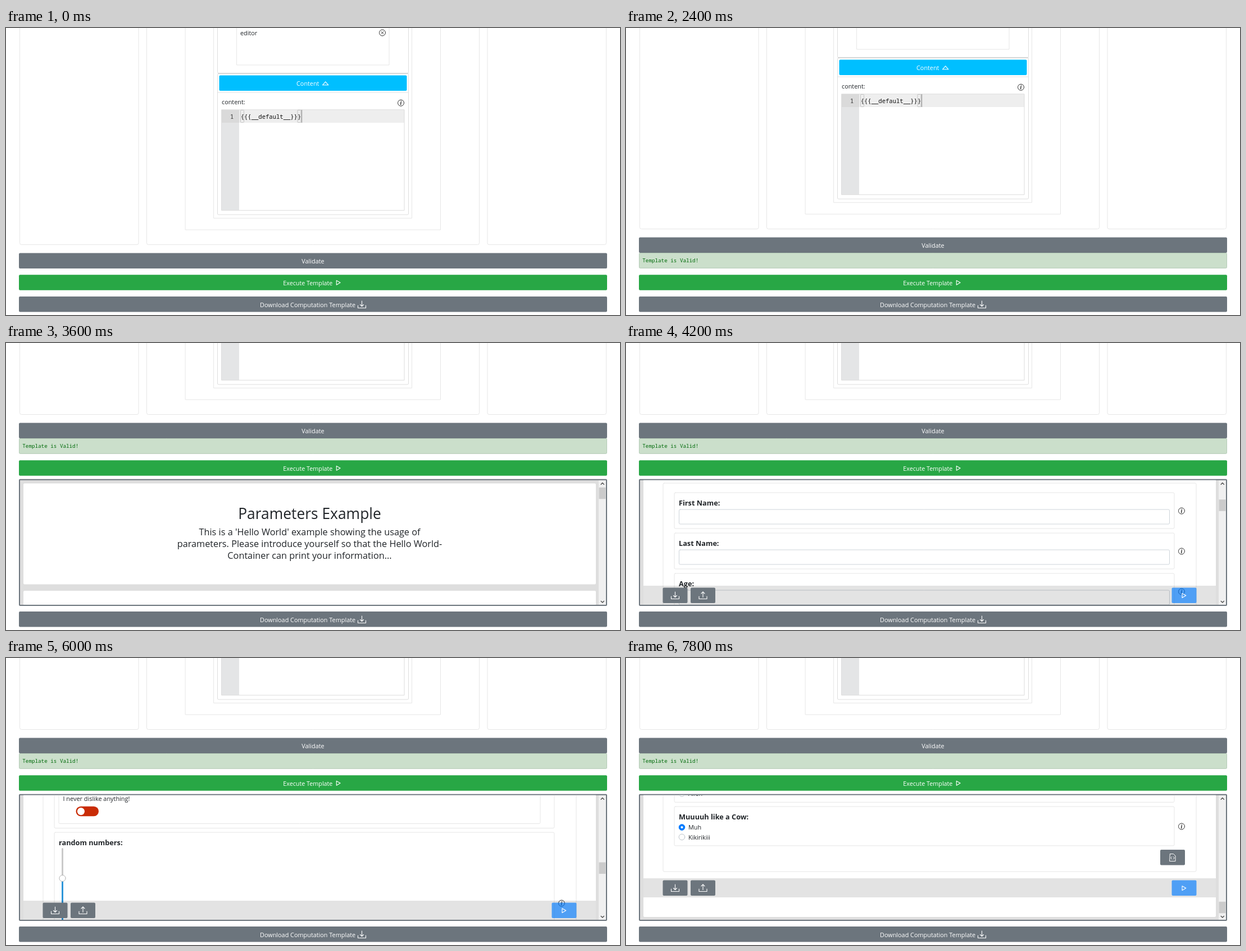
Write an HTML page with a canvas that moves like this. It is 1093 px wide and 512 px high and loops after 8000 ms.

```html
<!DOCTYPE html>
<html lang="en">
<head>
<meta charset="utf-8">
<title>Template editor</title>
<style>
  html, body { margin: 0; width: 100%; height: 100%; overflow: hidden; background: #fff; }
  canvas { display: block; width: 1093px; height: 512px; }
</style>
</head>
<body>
<canvas id="stage" width="1093" height="512"></canvas>
<script>
const ctx = document.getElementById('stage').getContext('2d');
const SANS = '"Open Sans", "Noto Sans", sans-serif';
const MONO = '"Noto Sans Mono", "DejaVu Sans Mono", monospace';
const INK = '#212529', GRAY = '#6c757d', GREEN = '#28a745', LINE = '#e6e6e6', BLUE = '#007bff';
const LOOP = 8000, STEP = 600;
const SCROLLS = [0, 237, 473, 825, 1177, 1480, 1740, 1950];
const FORM_TOP = 487, FORM_END = 2331, BAR_END = 2343;

function path(x1, y1, x2, y2, r = 2) {
  ctx.beginPath();
  ctx.roundRect(x1, y1, x2 - x1, y2 - y1, r);
}
function fill(x1, y1, x2, y2, color, r = 0) {
  path(x1, y1, x2, y2, r);
  ctx.fillStyle = color;
  ctx.fill();
}
function frame(x1, y1, x2, y2, color = LINE, r = 2, w = 1) {
  path(x1, y1, x2, y2, r);
  ctx.strokeStyle = color;
  ctx.lineWidth = w;
  ctx.stroke();
}
function text(str, x, y, size = 10.85, color = INK, { weight = 400, family = SANS, align = 'left' } = {}) {
  ctx.font = `${weight} ${size}px ${family}`;
  ctx.textAlign = align;
  ctx.fillStyle = color;
  ctx.fillText(str, x, y);
}
function line(points, color, w = 1, close = false) {
  ctx.beginPath();
  points.forEach(([x, y]) => ctx.lineTo(x, y));
  if (close) ctx.closePath();
  ctx.strokeStyle = color;
  ctx.lineWidth = w;
  ctx.lineJoin = ctx.lineCap = 'round';
  ctx.stroke();
}
function disc(x, y, r, color, edge) {
  ctx.beginPath();
  ctx.arc(x, y, r, 0, Math.PI * 2);
  if (color) { ctx.fillStyle = color; ctx.fill(); }
  if (edge) { ctx.strokeStyle = edge; ctx.lineWidth = 1; ctx.stroke(); }
}
function shifted(dy, draw) {
  ctx.save();
  ctx.translate(0, dy);
  draw();
  ctx.restore();
}

function infoIcon(x, y) {
  disc(x, y, 5.5, null, '#333');
  text('i', x, y + 3.4, 10, '#222', { weight: 'italic 700', family: '"Liberation Serif", serif', align: 'center' });
}
function trayIcon(x, y, up) {
  line([[x - 7, y + 1.5], [x - 7, y + 6], [x + 7, y + 6], [x + 7, y + 1.5]], '#fff', 1.1);
  line([[x, y - 6.5], [x, y + 3]], '#fff', 1.1);
  const tip = up ? y - 6.5 : y + 3, d = up ? 3 : -3;
  line([[x - 3, tip + d], [x, tip], [x + 3, tip + d]], '#fff', 1.1);
}
function playIcon(x, y) {
  line([[x - 3.2, y - 3.9], [x + 3.6, y], [x - 3.2, y + 3.9]], '#fff', 1.1, true);
}
function wideButton(y, color) {
  fill(23, y, 1070, y + 27.5, color, 2);
}

function editorPage() {
  frame(24.5, -20, 236, 386.5, LINE, 3);
  frame(250.5, -20, 842.5, 386.5, LINE, 3);
  frame(857, -20, 1068.5, 386.5, LINE, 3);
  frame(319.5, -20, 773.5, 360, LINE, 0);
  frame(370, -20, 722.5, 339.3, LINE, 0);
  frame(376.5, -20, 716.5, 80.5, '#dedede');
  frame(376.5, 81.5, 716.5, 333, '#dedede');
  line([[377, 81], [716, 81]], '#cfcfcf');
  line([[377, 115], [716, 115]], '#e2e2e2');
  frame(411, -20, 682, 66, LINE, 0);
  text('editor', 417, 12.7);
  disc(670, 8.5, 5.5, null, '#333');
  line([[668, 6.5], [672, 10.5]], '#333');
  line([[672, 6.5], [668, 10.5]], '#333');

  fill(379.5, 84.5, 713.5, 112, '#00bfff', 2);
  text('Content', 517, 102.8, 10.85, '#fff');
  line([[563.5, 101.8], [568.7, 95.8], [573.9, 101.8]], '#fff', 1.1, true);
  text('content:', 384, 136);
  infoIcon(703, 133.7);

  fill(384, 146, 415, 325, '#e4e5e6');
  fill(384, 146, 415, 169, '#dadada');
  fill(415, 146, 709, 169, '#eeeeee');
  frame(384, 145.8, 709, 325.3, '#dcdcdc', 0);
  frame(417.5, 146.5, 423.5, 168.5, '#c4c4c4', 1);
  frame(519, 146.5, 525, 168.5, '#c4c4c4', 1);
  text('1', 402.2, 162, 10.5, '#333', { family: MONO, align: 'center' });
  text('{{{__default__}}}', 417.7, 162, 10.55, '#111', { family: MONO });
  fill(525.6, 146, 527.2, 169, '#a4a4a4');
}

function fieldset(top, bottom, title) {
  frame(86, top, 976, bottom);
  text(title, 94, top + 23, 12.7, INK, { weight: 700 });
  infoIcon(989, (top + bottom) / 2 + .5);
}
function input(top, bottom, title) {
  fieldset(top, bottom, title);
  frame(94.5, top + 30, 967.5, bottom - 8, '#ced4da');
}
function choices(top, title, labels, checked, { square = false, disabled = -1 } = {}) {
  fieldset(top, top + 35.1 + 17.4 * labels.length, title);
  labels.forEach((label, i) => {
    const y = top + 37 + 17.4 * i, on = i === checked, off = i === disabled;
    const color = on ? BLUE : off ? '#e9ecef' : '#fff', edge = on ? BLUE : '#b8bfc6';
    if (square) {
      fill(94, y - 5.5, 105, y + 5.5, color, 2.5);
      frame(94.2, y - 5.3, 104.8, y + 5.3, edge, 2.5);
      if (on) line([[97, y], [98.9, y + 2], [102.2, y - 2]], '#fff', 1.4);
    } else {
      disc(99.5, y, 5.3, color, edge);
      if (on) disc(99.5, y, 2.1, '#fff');
    }
    text(label, 111, y + 4.2, 10.85, off ? GRAY : INK);
  });
}
function toggle(y, label) {
  text(label, 101.5, y, 10.9);
  fill(124.5, y + 9.5, 165, y + 27, '#c92c06', 8.7);
  disc(133.4, y + 18.3, 6.6, '#fff');
}
function slider(x, top, knob, bottom) {
  fill(x - 1.5, top, x + 1.5, knob, '#cacaca', 1.5);
  fill(x - 1.5, knob, x + 1.5, bottom, '#2f96d9', 1.5);
  disc(x, knob, 5.6, '#fff', '#b5b5b5');
}

function formDocument() {
  fill(31, 250.5, 1050, 430.5, '#fff', 2);
  fill(31, 442, 1050, 2412, '#fff', 2);
  const mid = { align: 'center' };
  text('Parameters Example', 540.5, 313.5, 26.4, INK, mid);
  ["This is a 'Hello World' example showing the usage of",
   'parameters. Please introduce yourself so that the Hello World-',
   'Container can print your information...'
  ].forEach((row, i) => text(row, 540.5, 343 + 20.8 * i, 16.28, INK, mid));

  frame(66, FORM_TOP, 1015, FORM_END);
  ['First Name:', 'Last Name:', 'Age:'].forEach((title, i) => input(504 + 72 * i, 568 + 72 * i, title));
  choices(720, 'Things I like:', ['Programming', 'music', 'books'], 0, { square: true });
  choices(815, 'Favorite PL:', ['C', 'Java', 'Haskell', 'Sssss... Python ...ssssS'], 1, { disabled: 2 });
  choices(928, 'colors:', ['red', 'green', 'blue', 'yellow'], 0, { square: true });
  choices(1041, 'Season:', ['spring', 'summer', 'winter'], 1);
  choices(1136, 'Instrument:', ['piano', 'guitar', 'drums', 'none'], 0);

  fieldset(1249, 1480.5, 'Things I dislike:');
  frame(94, 1280, 951, 1472.5);
  ['rain', 'noise', 'waiting'].forEach((word, i) => toggle(1297 + 45 * i, `I dislike ${word}!`));
  toggle(1432.3, 'I never dislike anything!');

  fieldset(1488, 1740, 'random numbers:');
  slider(100.5, 1516, 1570, 1722);
  choices(1748, 'Weekday:', ['Monday', 'Tuesday', 'Friday', 'Sunday'], 2);
  choices(1861, 'Drink:', ['water', 'tea', 'coffee'], 1);
  input(1956, 2112, 'About me:');
  choices(2120, 'Species:', ['Human', 'Robot', 'Alien'], 0);
  choices(2215, 'Muuuuh like a Cow:', ['Muh', 'Kikirikiii'], 0);

  fill(951, 2292, 995, 2319.5, GRAY, 2);
  line([[968, 2299.5], [974.5, 2299.5], [978, 2303], [978, 2312.5], [968, 2312.5]], '#fff', 1, true);
  line([[971.6, 2304.5], [969.8, 2306.7], [971.6, 2308.9]], '#fff');
  line([[974.4, 2304.5], [976.2, 2306.7], [974.4, 2308.9]], '#fff');
}

function actionBar() {
  fill(31, 0, 1050, 34, 'rgba(0,0,0,.11)');
  fill(65.5, 3.5, 109.5, 31, GRAY, 2);
  fill(115, 3.5, 159, 31, GRAY, 2);
  trayIcon(87.5, 17.5, false);
  trayIcon(137, 17.5, true);
  fill(971.5, 3.5, 1015.5, 31, 'rgba(0,123,255,.65)', 2);
  playIcon(993.2, 17.6);
}

function scrollbar(scroll) {
  fill(1055, 245, 1068, 467, '#f0f0f0');
  const top = 257.7 + scroll * 177 / 1950;
  fill(1055.5, top, 1067.5, top + 20.5, '#cbcbcb');
  line([[1059.2, 252.2], [1061.8, 249.6], [1064.4, 252.2]], '#505050', 1.4);
  line([[1059.2, 460.4], [1061.8, 463], [1064.4, 460.4]], '#505050', 1.4);
}

function outputPanel(scroll) {
  fill(23, 242.7, 1070, 469, GRAY, 2);
  ctx.save();
  path(25, 244.7, 1068, 467, 0);
  ctx.clip();
  fill(25, 244, 1068, 468, '#dedede');
  shifted(-scroll, formDocument);
  // The bar sticks to the lower edge until its resting place scrolls into view.
  const barY = Math.max(FORM_TOP - scroll, Math.min(433, BAR_END - scroll));
  shifted(barY, actionBar);
  scrollbar(scroll);
  ctx.restore();
}

function pointer(x, y) {
  const shape = [[0, 0], [0, 17], [4, 13.4], [7, 19.8], [9.6, 18.6], [6.8, 12.4], [12, 12]];
  const points = shape.map(([dx, dy]) => [x + 1 + dx, y + .7 + dy]);
  line(points, '#000', 1, true);
  ctx.fillStyle = '#fff';
  ctx.fill();
}

function draw(t) {
  const valid = t >= 1200, open = t >= 3600;
  const offset = open ? 259 : t >= 2400 ? 28 : 0;
  fill(0, 0, 1093, 512, '#fff');

  shifted(-offset, () => {
    editorPage();
    wideButton(401.5, GRAY);
    text('Validate', 546.5, 419.6, 10.85, '#fff', { align: 'center' });
    if (valid) {
      fill(23, 429, 1070, 456.5, '#cbdfcb', 2);
      frame(23.5, 429.5, 1069.5, 456.3, '#b5cbb7');
      text('Template is Valid!', 29.3, 446.2, 9.25, '#006b0a', { weight: 500, family: MONO });
    }
    const y = valid ? 468.3 : 440.3;
    wideButton(y, GREEN);
    text('Execute Template', 493.3, y + 18.2, 10.75, '#fff');
    playIcon(591.5, y + 14);
  });

  const last = valid && offset === 0 ? 507 : 479;
  wideButton(last, GRAY);
  text('Download Computation Template', 452, last + 18.6, 10.85, '#fff');
  trayIcon(633.5, last + 14.5, false);

  if (open) outputPanel(SCROLLS[Math.floor((t - 3600) / STEP)]);
  if (t >= 600 && t < 1200) pointer(587, 405);
  if (t >= 3000 && t < 3600) pointer(616, 442);
}

const start = performance.now();
function tick() {
  draw((performance.now() - start) % LOOP);
  requestAnimationFrame(tick);
}
tick();
</script>
</body>
</html>
```
